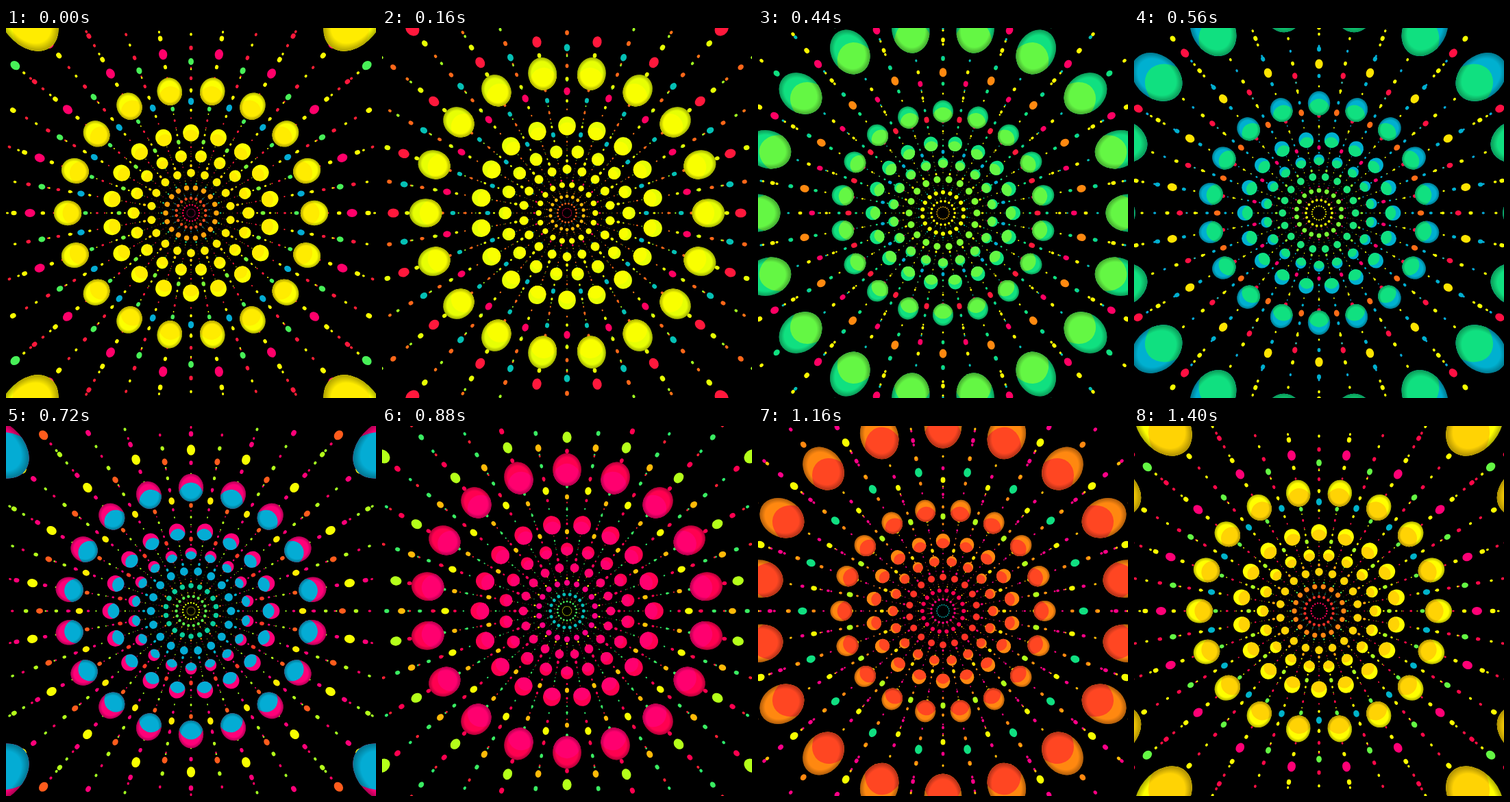
Recreate the animation shown at these times as an HTML page with a canvas. Size 540 by 540 pixels, loop 1440 ms.

```html
<!DOCTYPE html>
<html lang="en">
<head>
<meta charset="utf-8">
<title>Bead tunnel</title>
<style>
html, body { margin: 0; height: 100%; overflow: hidden; background: #000; }
canvas { display: block; width: 540px; height: 540px; }
</style>
</head>
<body>
<canvas id="stage" width="540" height="540"></canvas>
<script>
const ctx = document.getElementById('stage').getContext('2d');
const LOOP = 1440, STEP = 720, SPOKES = 18;

// [time, r, g, b]
const palette = [
  [0, 255, 236, 0], [80, 255, 255, 0], [270, 240, 255, 0], [400, 128, 255, 48],
  [560, 16, 224, 128], [680, 0, 176, 208], [770, 8, 168, 216], [780, 255, 0, 136],
  [1000, 255, 0, 80], [1120, 255, 48, 40], [1280, 255, 136, 16], [1440, 255, 236, 0]
];

// Distance from the centre after each step outwards
const ringPath = [6, 12, 21.5, 37, 58.5, 84, 117, 180, 370, 950];
const beadPath = [17, 27, 43, 69, 105, 163, 235, 326, 440];
const fastPath = [15, 24, 36, 53, 76, 108, 154, 221, 335, 520];

// Each chain: parity of its first point, path, lead of its colour and [distance, size] of the beads
const chains = [
  { start: -4, path: beadPath, lead: r => Math.min(900, 1290 - 92000 / r), beads: [[1, .026]] },
  { start: -4, path: beadPath, lead: () => 120, beads: [[.92, .012], [1.1, .0125]] },
  { start: -4, path: beadPath, lead: () => 1080, beads: [[.85, .007], [1.2, .007], [1.3, .006]] },
  { start: -6, path: fastPath, lead: () => 480, beads: [[1, .018]] },
  { start: -6, path: fastPath, lead: () => 1060, beads: [[.89, .011], [1.09, .011]] },
  { start: -6, path: fastPath, lead: () => 200, beads: [[.8, .006], [.95, .006], [1.18, .007]] }
];

function colour(time) {
  const t = ((time % LOOP) + LOOP) % LOOP;
  const i = palette.findIndex(stop => stop[0] > t);
  const a = palette[i - 1], b = palette[i];
  const f = (t - a[0]) / (b[0] - a[0]);
  return `rgb(${[1, 2, 3].map(n => Math.round(a[n] + (b[n] - a[n]) * f))})`;
}

// Smooth curve through the logarithms of the distances
function along(path, v) {
  const i = Math.floor(v), f = v - i;
  const at = n => Math.log(path[Math.max(0, Math.min(path.length - 1, n))]);
  const a = at(i - 1), b = at(i), c = at(i + 1), d = at(i + 2);
  return Math.exp(b + f / 2 * (c - a + f * (2 * a - 5 * b + 4 * c - d + f * (3 * (b - c) + d - a))));
}

function disc(x) {
  ctx.beginPath();
  ctx.arc(x, 0, 1, 0, 2 * Math.PI);
}

function eachSpoke(odd, r, long, wide, draw) {
  for (let i = 0; i < SPOKES; i++) {
    ctx.save();
    ctx.translate(270, 270);
    ctx.rotate((i + odd / 2) * 2 * Math.PI / SPOKES);
    ctx.translate(r, 0);
    ctx.scale(long, wide);
    draw();
    ctx.restore();
  }
}

function drawChain({ start, path, lead, beads }, time) {
  for (let n = 0; n < path.length - 1; n++) {
    const base = along(path, n + time / STEP % 1);
    const odd = Math.abs(n + start - Math.floor(time / STEP)) % 2;
    for (const [distance, size] of beads) {
      const r = base * distance, wide = r * size;
      if (r > 400) continue;
      ctx.fillStyle = colour(time + lead(r));
      eachSpoke(odd, r, wide * 1.25, wide, () => { disc(0); ctx.fill(); });
    }
  }
}

const shade = ctx.createRadialGradient(0, 0, .75, 0, 0, 1);
shade.addColorStop(0, 'rgba(0,0,0,0)');
shade.addColorStop(1, 'rgba(0,0,0,.32)');

function drawRings(time) {
  for (let n = 0; n < ringPath.length - 1; n++) {
    const r = along(ringPath, n + time / STEP % 1);
    if (r > 460) continue;
    const odd = Math.abs(n - 7 - Math.floor(time / STEP)) % 2;
    const wide = r * .101, long = wide * Math.hypot(1, r / 370);
    const lag = 280 * Math.max(0, Math.log(56 / r));
    const shift = .63 * Math.max(0, Math.min(1, (r - 64) / 16));
    const inner = colour(time - lag), outer = colour(time - lag + 120);
    eachSpoke(odd, r, long, wide, () => {
      disc(0);
      ctx.fillStyle = shift ? outer : inner;
      ctx.fill();
      if (!shift) return;
      ctx.clip();
      disc(-shift);
      ctx.fillStyle = inner;
      ctx.fill();
      if (r > 130) {
        disc(0);
        ctx.fillStyle = shade;
        ctx.fill();
      }
    });
  }
}

function frame(now) {
  const time = Math.floor(now % LOOP / 40) * 40;
  ctx.fillStyle = '#000';
  ctx.fillRect(0, 0, 540, 540);
  chains.forEach(chain => drawChain(chain, time));
  drawRings(time);
  requestAnimationFrame(frame);
}
requestAnimationFrame(frame);
</script>
</body>
</html>
```
